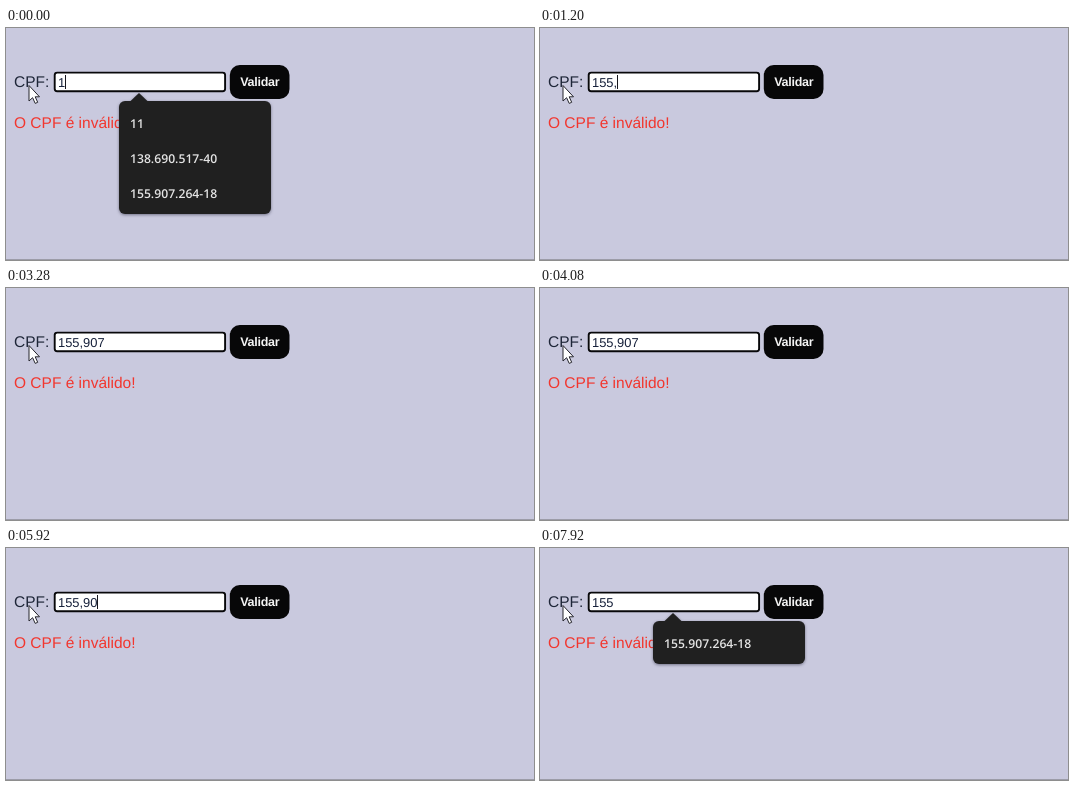
Animation, 528 px wide and 232 px high, one loop 8 s. Source, as an HTML page:

```html
<!DOCTYPE html>
<html lang="pt">
<head>
<meta charset="utf-8">
<title>CPF</title>
<style>
  html, body { margin: 0; width: 100%; height: 100%; overflow: hidden; background: #c9c9de; }
  svg { display: block; width: 528px; height: 232px; }
  text { font-family: "Liberation Sans", Arial, sans-serif; white-space: pre; text-rendering: geometricPrecision; }
  .page { font-size: 15.5px; }
  .typed { font-size: 12.9px; fill: #16203a; }
  .button { font-size: 12.5px; font-weight: 700; letter-spacing: -.25px; fill: #f4f4f4; }
  .popup { filter: drop-shadow(0 1px 1.5px rgba(30, 30, 50, .5)); }
  .popup text { font: 600 12.2px "Open Sans", "Noto Sans", sans-serif; fill: #e4e4e4; }
</style>
</head>
<body>
<svg viewBox="0 0 528 232">
  <rect width="528" height="232" fill="#c9c9de"/>
  <rect y="231" width="528" height="1" fill="#9c9ca8"/>
  <text class="page" x="8" y="58.5" fill="#1e2638">CPF:</text>
  <text class="page" x="8" y="100" fill="#f2362e">O CPF é inválido!</text>
  <rect x="48.7" y="44.6" width="170.4" height="18.6" rx="2.5" fill="#fff" stroke="#08080a" stroke-width="1.9"/>
  <text class="typed" id="typed" x="52" y="58.5"></text>
  <rect id="caret" y="47" width="1" height="14" fill="#16161c"/>
  <rect x="223.8" y="37" width="59.7" height="34" rx="10" fill="#070708"/>
  <text class="button" x="234.2" y="58">Validar</text>
  <g class="popup" id="popup">
    <path d="M123.5 74 L133 65 L142.5 74 Z" fill="#202020"/>
    <rect id="panel" x="113" y="73" width="152" rx="6" fill="#202020"/>
    <g id="rows"></g>
  </g>
  <path d="M23 57.5 V73 L26.6 69.7 L29.2 75.4 L31.7 74.3 L29.2 68.8 H33.5 Z"
        fill="#fff" stroke="#25252d" stroke-width="1" stroke-linejoin="round"/>
</svg>
<script>
  const LOOP = 8000, BLINK = 500, ROW = 35;
  const FIRST = "138.690.517-40", SECOND = "155.907.264-18";

  // [time, field value]; each key press restarts the caret blink
  const KEYS = [
    [0, "1"], [80, "15"], [240, "155"], [960, "155,"],
    [1840, "155,9"], [2160, "155,90"], [2480, "155,907"],
    [5920, "155,90"], [6080, "155,9"], [6160, "155,"], [6320, "155"]
  ];

  // [time, suggestions]
  const LISTS = [
    [0, ["11", FIRST, SECOND]], [160, [SECOND]], [1040, []], [6960, [SECOND]]
  ];

  const $ = id => document.getElementById(id);
  const at = (steps, t) => steps.filter(s => s[0] <= t).pop();
  let value, list;

  function showValue(text) {
    value = text;
    $("typed").textContent = text;
    $("caret").setAttribute("x", Math.round(51.7 + $("typed").getComputedTextLength()));
  }

  function showList(items) {
    list = items;
    $("popup").style.display = items.length ? "" : "none";
    $("panel").setAttribute("height", 8 + ROW * Math.max(1, items.length));
    $("rows").innerHTML = items
      .map((item, i) => `<text x="124" y="${99.5 + ROW * i}">${item}</text>`).join("");
  }

  function draw(t) {
    const [pressed, text] = at(KEYS, t);
    const items = at(LISTS, t)[1];
    if (text !== value) showValue(text);
    if (items !== list) showList(items);
    const on = (t - pressed) % (2 * BLINK) < BLINK;
    $("caret").style.visibility = on ? "visible" : "hidden";
  }

  const start = performance.now();
  function frame() {
    draw((performance.now() - start) % LOOP);
    requestAnimationFrame(frame);
  }
  frame();
</script>
</body>
</html>
```
